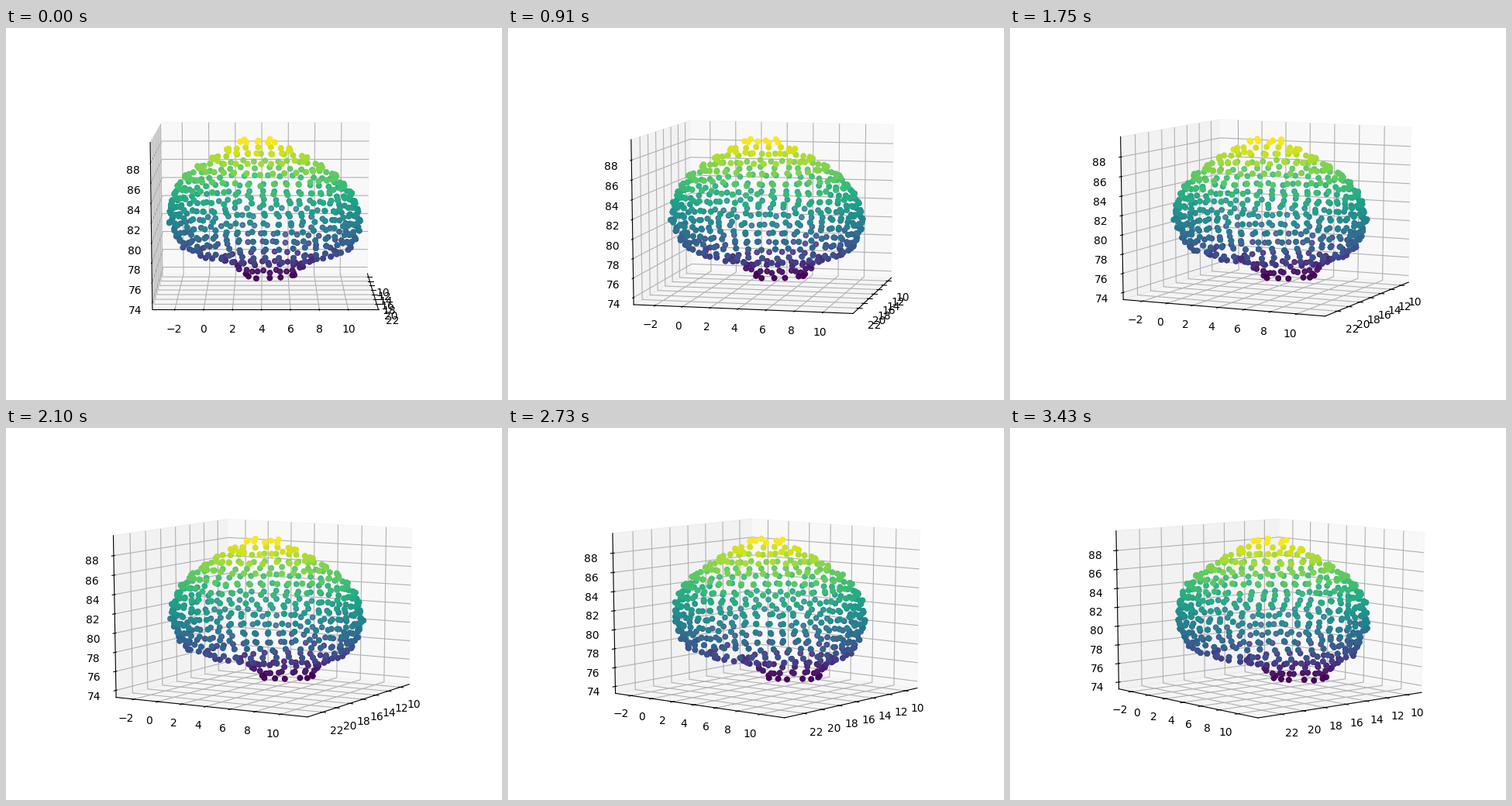
These frames come from a looping animation (640x480 px, 3500 ms). A matplotlib script:

```python
import numpy as np
import matplotlib.pyplot as plt
from matplotlib.animation import FuncAnimation

FRAMES, INTERVAL = 50, 70
CENTER_X, CENTER_Y = 16.3, 4.27
HALF = 7.82
TOP, BOTTOM, ROWS = 89.0, 74.4, 17
SPACING = 0.92
OVERLAP = 4  # coincident markers keep the far side from fading out


def radius(z):
    """Outline of the shell: narrow foot, wide belly, rounded top."""
    heights = [74.4, 76, 77, 78.2, 80.5, 83, 85, 87, 89]
    radii = [1.9, 2.9, 5.0, 6.2, 6.9, 6.65, 5.8, 3.7, 1.2]
    return np.interp(z, heights, radii)


def contour(z):
    """Evenly spaced points around one level, starting at the front."""
    r = radius(z)
    count = round(2 * np.pi * r / SPACING)
    angle = 2 * np.pi * np.arange(count) / count
    shift_x = np.interp(z, [74.4, 76, 78, 89], [-2.7, -2.4, -0.3, -0.5])
    shift_y = 0.06 * (80 - z)
    return np.column_stack([
        CENTER_X + shift_x + r * np.cos(angle),
        CENTER_Y + shift_y + r * np.sin(angle),
        np.full(count, z),
    ])


rng = np.random.default_rng(4)
points = np.vstack([contour(z) for z in np.linspace(TOP, BOTTOM, ROWS)])
points += rng.normal(0, 0.07, points.shape)
x, y, z = np.repeat(points, OVERLAP, axis=0).T

fig = plt.figure(figsize=(6.4, 4.8), dpi=100)
ax = fig.add_subplot(projection="3d")
# Unit cube stretched over the whole, non-square axes area.
ax.apply_aspect = lambda position=None: None
ax.set_box_aspect((1, 1, 1), zoom=0.9468)
ax.scatter(x, y, z, c=z, cmap="viridis")
ax.set(
    xlim=(CENTER_X - HALF, CENTER_X + HALF),
    ylim=(CENTER_Y - HALF, CENTER_Y + HALF),
    zlim=(73.26, 90.05),
    xticks=range(10, 23, 2),
    yticks=range(-2, 11, 2),
    zticks=range(74, 89, 2),
)


def update(frame):
    ax.view_init(elev=10, azim=frame)
    return ()


anim = FuncAnimation(fig, update, frames=FRAMES, interval=INTERVAL,
                     init_func=lambda: update(0), repeat=True)
plt.show()
```
